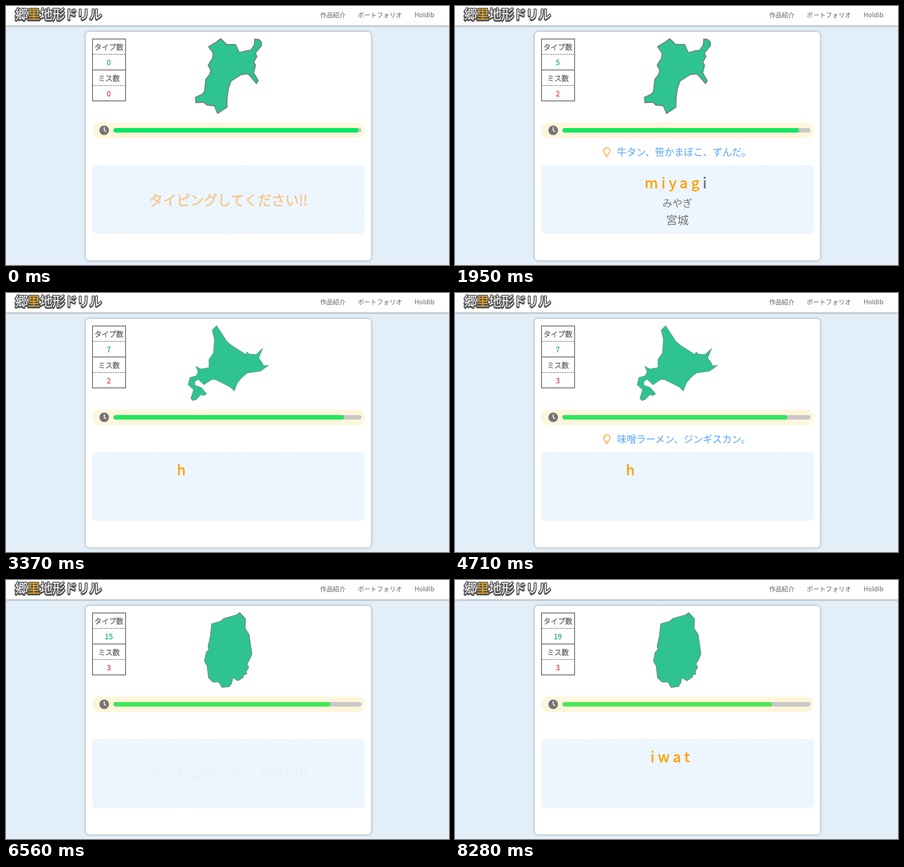
Animation of 978 by 573 pixels, one loop 8.35 s. Source, as an HTML page:

```html
<!DOCTYPE html>
<html lang="ja">
<head>
<meta charset="utf-8">
<title>郷里地形ドリル</title>
<style>
  html, body { margin: 0; width: 100%; height: 100%; overflow: hidden; background: #e2eff8; }
  .stage { position: relative; width: 978px; height: 573px; overflow: hidden; }
  .stage > * { position: absolute; }
  header { left: 0; top: 0; width: 978px; height: 43px; background: #fff; box-shadow: 0 1px 4px #888; }
  .card { left: 176px; top: 57px; width: 630px; height: 506px; border-radius: 8px; background: #fff; box-shadow: 0 0 5px #848a8f; }
  .board {
    left: 190px; top: 351.5px; width: 602px; height: 152.5px; border-radius: 8px;
    background: repeating-linear-gradient(-45deg, #f0f8ff, #f0f8ff 3px, #e9f4ff 3px, #e9f4ff 7px);
  }
  svg { left: 0; top: 0; }
  text { font-family: "Noto Sans CJK JP", "Noto Sans JP", "Noto Sans CJK", "Noto Sans", sans-serif; fill: #757575; white-space: pre; }
  .mid { text-anchor: middle; }
  .medium { stroke: currentColor; stroke-width: .03em; fill: currentColor; }
  .logo { font-size: 28px; letter-spacing: -.7px; fill: #fff; stroke: #555; stroke-width: 4px; stroke-linejoin: round; paint-order: stroke; }
  .logo .hot { fill: #f3ae20; }
  .logo.under, .logo.under .hot { fill: #555; }
  .nav { font-size: 14px; fill: #636363; }
  .stat { font-size: 16px; color: #6f6f6f; }
  #typed { color: #2fb585; }
  #missed { color: #e25050; }
  .prompt { font-size: 30.2px; color: #ffa943; }
  .word { font-size: 32px; letter-spacing: 7.6px; }
  #done { color: #ffa30f; }
  #rest { color: #757575; }
  #kana { font-size: 22px; }
  #kanji { font-size: 25px; }
  #hintText { font-size: 21.3px; fill: #55a5fb; }
  .map { fill: #2fc292; stroke: #767676; stroke-linejoin: round; }
</style>
</head>
<body>
<div class="stage">
  <header></header>
  <div class="card"></div>
  <div class="board"></div>
  <svg width="978" height="573" viewBox="0 0 978 573">
    <text class="logo under" x="20" y="30.5">郷<tspan class="hot">里</tspan>地形ドリル</text>
    <text class="logo" x="20" y="28.5">郷<tspan class="hot">里</tspan>地形ドリル</text>
    <text class="nav" x="693.5" y="25">作品紹介</text>
    <text class="nav" x="776.5" y="25">ポートフォリオ</text>
    <text class="nav" x="902" y="25">Holdib</text>

    <g fill="none" stroke="#757575" stroke-width="2">
      <path d="M191 73H264V210H191ZM191 141.5H264"/>
      <path d="M192 107H263M192 176H263" stroke-dasharray="2 2"/>
    </g>
    <text class="mid medium stat" x="227.3" y="96.5">タイプ数</text>
    <text class="mid medium stat" x="227" y="131" id="typed"></text>
    <text class="mid medium stat" x="227.3" y="165.5">ミス数</text>
    <text class="mid medium stat" x="227" y="200" id="missed"></text>

    <path class="map" id="miyagi" stroke-width="1.8" d="M474 72L487 85H507L515 103 530 99 540 98 548 86 549 73 558 74 564 80V88L551 104 554 112 547 124 551 131 547 148 557 165 553 172 537 153 532 150 519 152 497 166 491 183 488 207V224L467 238 460 221 443 219 437 213 419 214 418 202 433 195 438 189 441 162 449 152 452 142 446 131 456 115 457 104 447 90 465 79Z"/>
    <path class="map" id="hokkaidou" stroke-width=".8" d="M465 72L480 95 487 106 497 115 514 126 530 136 532 130 537 135 552 136 567 122 558 144 565 153 569 161 580 160 562 173 533 177 521 187 511 199 504 217 495 208 463 192 455 191 437 203 424 191 417 196V204L431 209 443 223 437 227 430 225 420 236 412 238 408 233 414 214 402 203 406 187 420 183 424 174 419 162 430 168 448 165V147L458 132 460 102 455 82Z"/>
    <path class="map" id="iwate" stroke-width="1.2" d="M516 72L529 86 528 107 537 121 540 143 543 163 538 176 532 186 536 193 530 203 532 208 525 210 524 215 512 223 501 216 498 229 493 236 477 238 470 226H457L447 216 444 190 438 179 442 160 448 154 446 147 451 125 454 97 474 91 481 85 509 77Z"/>

    <rect x="190" y="258" width="602" height="34" rx="16" fill="#fff6db"/>
    <circle cx="216.8" cy="275" r="10.6" fill="#757575"/>
    <path d="M216.8 269V275L220.3 277.8" fill="none" stroke="#fff" stroke-width="2" stroke-linecap="round"/>
    <rect x="237" y="270" width="548" height="10" rx="5" fill="#c8c8c8"/>
    <rect id="bar" x="237" y="270" height="10" rx="5"/>

    <g id="hint">
      <g fill="none" stroke="#ffa943" stroke-width="1.8">
        <path d="M331.5 328.5C331 325 327.8 324 327.8 320.6A7.2 7.2 0 0 1 342.2 320.6C342.2 324 339 325 338.5 328.5Z"/>
        <path d="M331.3 320.6A3.7 3.7 0 0 1 335 316.9" stroke-width="1.4" stroke-linecap="round"/>
        <path d="M331.5 331H338.5A3.5 3 0 0 1 331.5 331Z" fill="#ffa943" stroke="none"/>
      </g>
      <text id="hintText" x="357.5" y="331.3"></text>
    </g>
    <text id="prompt" class="mid medium prompt" x="491" y="441">タイピングしてください!!</text>
    <text class="mid word" x="491" y="402.5"><tspan id="done" class="medium"></tspan><tspan id="rest" class="medium"></tspan></text>
    <g id="answer">
      <text id="kana" class="mid" x="491" y="444"></text>
      <text id="kanji" class="mid" x="491" y="483.3"></text>
    </g>
  </svg>
</div>
<script>
const LOOP = 8350;
const PULSE = 1000;

// shown: when the prompt began to pulse; misses and keys: times of key presses
const quizzes = [
  {
    start: 0, shown: -560, misses: [430, 740], keys: [1130, 1320, 1500, 1660, 1820, 2200],
    word: 'miyagi', kana: 'みやぎ', kanji: '宮城', hint: '牛タン、笹かまぼこ、ずんだ。'
  },
  {
    start: 2200, shown: 2200, misses: [4200], keys: [3240, 5150, 5370, 5550, 5780, 5950, 6110, 6260, 6400],
    word: 'hokkaidou', kana: 'ほっかいどう', kanji: '北海道', hint: '味噌ラーメン、ジンギスカン。'
  },
  {
    start: 6400, shown: 6400, misses: [], keys: [7740, 7970, 8120, 8260],
    word: 'iwate', kana: 'いわて', kanji: '岩手', hint: ''
  }
];

const ui = {};
document.querySelectorAll('[id]').forEach(el => ui[el.id] = el);

const pressed = (times, t) => times.filter(at => at <= t).length;
const total = (kind, t) => quizzes.reduce((sum, q) => sum + pressed(q[kind], t), 0);
const show = (el, on) => el.style.visibility = on ? 'visible' : 'hidden';

function drawBar(t) {
  const p = t / LOOP;
  ui.bar.setAttribute('width', 541.5 - .0095 * t);
  ui.bar.setAttribute('fill', `rgb(${4 + 76 * p}, ${231 - p}, ${99 - 13 * p})`);
}

function render(now) {
  const t = now % LOOP;
  const quiz = quizzes.filter(q => q.start <= t).pop();
  const keys = pressed(quiz.keys, t);
  const misses = pressed(quiz.misses, t);

  ui.typed.textContent = total('keys', t);
  ui.missed.textContent = total('misses', t);
  quizzes.forEach(q => show(ui[q.word], q === quiz));
  drawBar(t);

  ui.hintText.textContent = quiz.hint;
  show(ui.hint, misses > 0);

  show(ui.prompt, keys + misses === 0);
  ui.prompt.setAttribute('opacity', .5 - .5 * Math.cos(Math.PI * (t - quiz.shown) / PULSE));

  ui.done.textContent = quiz.word.slice(0, keys);
  ui.rest.textContent = quiz.word.slice(keys);
  ui.kana.textContent = quiz.kana;
  ui.kanji.textContent = quiz.kanji;
  show(ui.rest, misses > 1);
  show(ui.answer, misses > 1);

  requestAnimationFrame(() => render(performance.now()));
}
render(performance.now());
</script>
</body>
</html>
```
